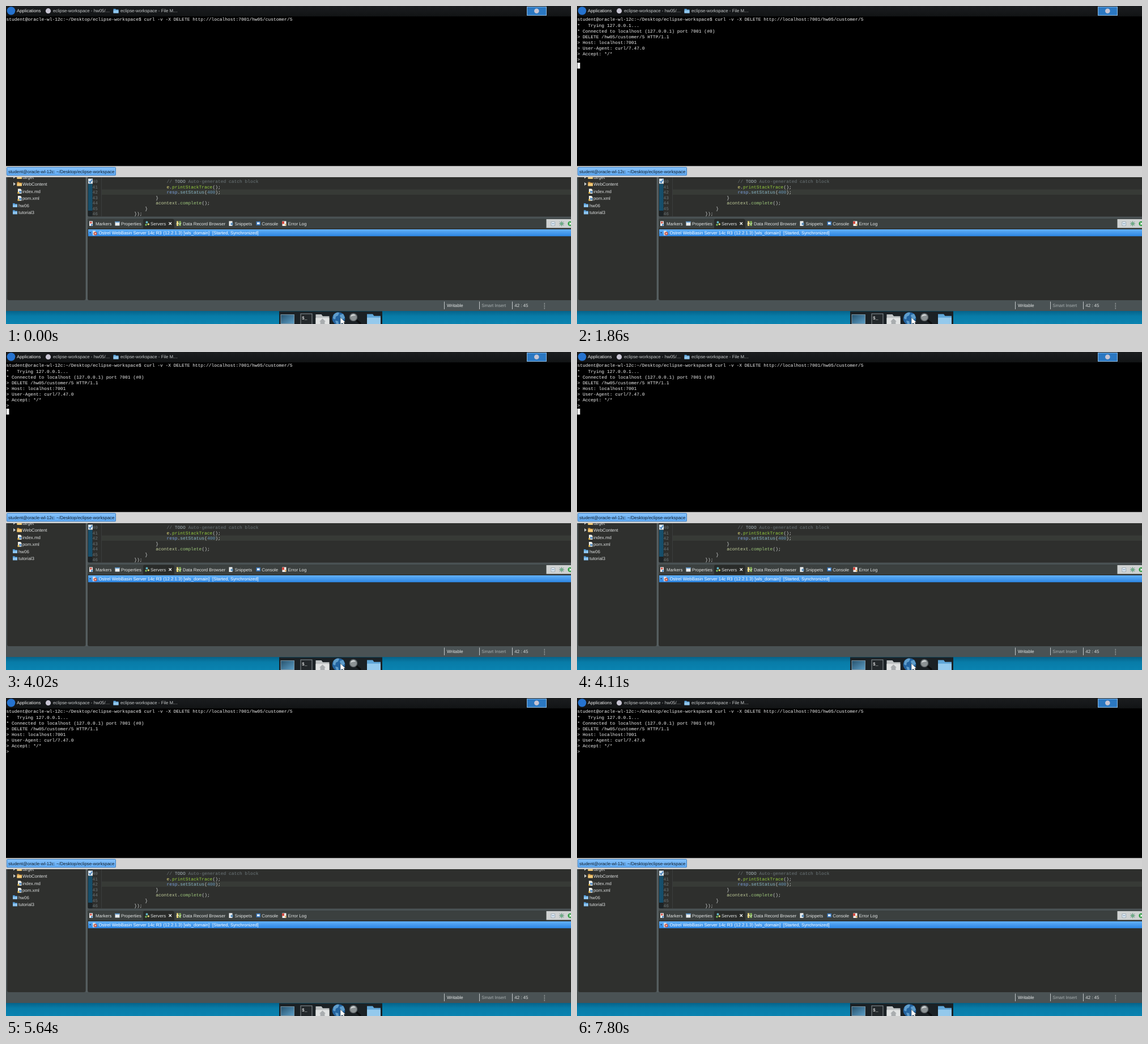
These frames come from a looping animation (997x561 px, 8000 ms). An HTML page:

```html
<!DOCTYPE html>
<html lang="en">
<head>
<meta charset="utf-8">
<title>Terminal session</title>
<style>
  html, body { margin: 0; width: 100%; height: 100%; overflow: hidden; background: #000; }
  svg { display: block; width: 997px; height: 561px; }
  text { white-space: pre; text-rendering: geometricPrecision; }
  .ui { font: 7.87px "Liberation Sans", Arial, sans-serif; }
  .mono { font: 7.95px "Liberation Mono", "Courier New", monospace; }
</style>
</head>
<body>
<svg id="stage" viewBox="0 0 997 561" xmlns="http://www.w3.org/2000/svg">
  <defs>
    <linearGradient id="bar" x2="0" y2="1"><stop stop-color="#1b1d1f"/><stop offset="1" stop-color="#121415"/></linearGradient>
    <linearGradient id="row" x2="0" y2="1"><stop stop-color="#62b0f8"/><stop offset="1" stop-color="#2c85e2"/></linearGradient>
    <linearGradient id="tab" x2="0" y2="1"><stop stop-color="#86c2fb"/><stop offset="1" stop-color="#5ea9f3"/></linearGradient>
    <linearGradient id="sky" x2="0" y2="1"><stop stop-color="#06638a"/><stop offset=".4" stop-color="#087ca8"/><stop offset="1" stop-color="#0a83b0"/></linearGradient>
    <linearGradient id="screen" x2="1" y2="1"><stop stop-color="#28546f"/><stop offset="1" stop-color="#5b9cc4"/></linearGradient>
  </defs>
</svg>
<script>
const NS = 'http://www.w3.org/2000/svg';
const LOOP = 8000;
const CH = 4.771;
const stage = document.getElementById('stage');
let layer = stage;

function add(tag, attrs, text) {
  const el = document.createElementNS(NS, tag);
  for (const k in attrs) el.setAttribute(k, attrs[k]);
  if (text) el.textContent = text;
  layer.appendChild(el);
  return el;
}
const rect = (x, y, w, h, fill, more) => add('rect', { x, y, width: w, height: h, fill, ...more });
const circle = (cx, cy, r, fill, more) => add('circle', { cx, cy, r, fill, ...more });
const path = (d, fill, more) => add('path', { d, fill, ...more });
const line = (d, stroke, w = 1) => path(d, 'none', { stroke, 'stroke-width': w });
const label = (x, y, s, fill = '#e4e6e6') => add('text', { x, y, fill, class: 'ui' }, s);
const mono = (x, y, s, fill = '#f2f2f2', more) => add('text', { x, y, fill, class: 'mono', ...more }, s);

// Colored pieces of one code line, laid out on the character grid
function code(x, y, ...parts) {
  for (const [s, fill, weight] of parts) {
    mono(x, y, s, fill, { 'font-weight': weight || 400 });
    x += s.length * CH;
  }
}
function folder(x, y, w, h, fill, front) {
  path(`M${x} ${y}h${w * .42}l${w * .1} ${h * .18}h${w * .48}v${h * .82}h${-w}z`, fill);
  rect(x, y + h * .35, w, h * .65, front);
}
function page(x, y) {
  path(`M${x} ${y}h4.5l2 2v6.5h-6.5z`, '#f1f1ea');
  rect(x + 2, y + 3.6, 4.2, 3.6, '#5a8fc6');
  rect(x - .6, y + 5.6, 3, 3, '#e2b64b');
}

function desktop() {
  rect(0, 538, 997, 23, 'url(#sky)');
  rect(482, 538.5, 182, 23, '#1b2125');
  rect(484.5, 544, 24.5, 18, '#7f98a6');
  rect(485.5, 545, 22.5, 15, 'url(#screen)');
  rect(519.5, 542.5, 21, 19, '#8d9497');
  rect(520.5, 543.5, 19, 18, '#23282b');
  mono(522, 552.5, '$_', '#ffffff', { 'font-weight': 700 });
  folder(546.5, 544, 24, 18, '#bfc3c4', '#e1e3e3');
  path('M553 556.5l5.5-5 5.5 5h-1.6v4.5h-7.8v-4.5z', '#a9adaf');
  circle(587, 551.5, 11.3, '#2464a0');
  path('M578 545q5-6 10-4l-2 5-4 2-1 5-4-2zM589 545l6-2 3 7-5 4-3-4zM581 555l5 1 1 5h-4z', '#5f9dcb');
  line('M617 553L626 560.5', '#0c0e0f', 3.4);
  circle(613, 549, 6.6, '#8d9395', { stroke: '#5c6265', 'stroke-width': 1.4 });
  path('M608 548a5 5 0 0 1 9-2q-4 0-9 2z', '#d0d4d5');
  folder(637, 543.5, 24, 18, '#5fa6d8', '#94c9ec');
  path('M590 549.5v11.5h1.5l1.6-2 1.5 2h3l-1.6-3h3z', '#ffffff', { stroke: '#20282c', 'stroke-width': .5 });
}

function tree() {
  rect(2, 296, 138.5, 223, '#2f302e', { rx: 3 });
  const rows = [[29, 304.6, 'target'], [29, 317, 'WebContent'], [29, 329.6, 'index.md'],
    [29, 342.1, 'pom.xml'], [22, 354.7, 'hw06'], [22, 367.2, 'tutorial3']];
  for (const [x, y, s] of rows) label(x, y, s, '#dddfdf');
  for (const y of [301.5, 314]) {
    path(`M13 ${y - 3}l4 3-4 3z`, '#c9cccc');
    folder(19.5, y - 3.5, 8.5, 7, '#d59a45', '#f0c877');
  }
  page(21, 322.5);
  page(21, 335);
  for (const y of [348, 360.3]) folder(12, y, 8, 7, '#4f98d4', '#8ec4ee');
}

function editor() {
  rect(144, 296, 860, 75.5, '#2e2f2d', { rx: 3 });
  rect(169, 323.6, 828, 9.4, '#373a36');
  rect(145, 302, 7.5, 69, '#1c2326');
  rect(145, 314, 7.5, 47, '#164e6a');
  line('M168.5 302V371', '#3a3d3c');
  for (let i = 0; i < 7; i++) mono(152.4, 312 + i * 9.5, String(40 + i), '#697377');
  rect(145, 304.5, 8, 9, '#dbe8f2');
  line('M146.5 309l2 2.5 3.5-5.5', '#2d71b5', 1.4);

  const gray = '#6d777a', plain = '#d0d3d3', lime = '#97cf3e';
  code(283.4, 312, ['// ', gray], ['TODO', '#a3b0b4', 700], [' Auto-generated catch block', gray]);
  code(283.4, 321.5, ['e', '#e3dc79'], ['.', plain], ['printStackTrace', lime], ['();', plain]);
  code(283.4, 331, ['resp', '#7a9fdc'], ['.', plain], ['setStatus', '#88b6c6'], ['(', plain], ['400', '#6897bb'], [');', plain]);
  code(264.3, 340.5, ['}', plain]);
  code(264.3, 350, ['acontext', '#c3cf9b'], ['.', plain], ['complete', '#9dc77a'], ['();', plain]);
  code(245.2, 359.5, ['}', plain]);
  code(226.2, 369, ['});', plain]);
}

function views() {
  rect(144, 375.5, 860, 143.5, '#2d2e2c', { rx: 3 });
  rect(144, 375.5, 853, 17, '#3b403f');
  path('M242 392.5v-14q0-3 3-3h48q3 0 4 3v14z', '#292b29');
  const tabs = [[158, 'Markers'], [203, 'Properties'], [255, 'Servers'], [312, 'Data Record Browser'],
    [403.5, 'Snippets'], [451.3, 'Console'], [497.6, 'Error Log']];
  for (const [x, s] of tabs) label(x, 386.8, s);
  line('M287.5 381.5l4.5 4.5M292 381.5l-4.5 4.5', '#f4f4f4', 1.2);

  rect(147, 379.5, 6, 8.5, '#eceeee');
  rect(148, 380.5, 3.5, 3, '#d45346');
  path('M150 384l4 2-4 2.5z', '#4f8cc8');
  rect(192.5, 380, 8, 7.5, '#e8ecee');
  rect(192.5, 380, 8, 2, '#5c97cc');
  circle(248.5, 381.5, 2, '#63b7c5');
  circle(247, 386, 1.7, '#74b95a');
  circle(251.3, 385, 1.8, '#d8cf72');
  rect(301, 379.5, 3.2, 8.5, '#e1cf72');
  rect(305.5, 379.5, 3.2, 8.5, '#86b65c');
  line('M300.5 384.5l3-2 3 3 3-2.5', '#f4f4e2', 1);
  rect(393.5, 379.5, 6, 8.5, '#edf0f1');
  rect(396.5, 382.5, 4, 4, '#5d8fbd');
  rect(441.5, 380, 7.5, 7, '#3975b8');
  rect(443, 381.7, 4.5, 3.4, '#eaf3fa');
  rect(487.5, 379.5, 7, 8.5, '#f0eeec');
  rect(487, 380, 4, 4.5, '#d54a40');
  path('M492 384l3 1-2 3.5z', '#e0a64b');

  rect(953.5, 376, 44, 15.5, '#cfd2d2');
  rect(962, 381, 6.5, 6.5, '#eef4f8', { stroke: '#7d93a6', 'stroke-width': .7 });
  line('M963.3 384.2h4', '#3f6f9b', 1);
  line('M977 380.5l7 7M984 380.5l-7 7M980.5 379.5v9M976 384h9', '#447a68', .8);
  circle(980.5, 384, 2.6, '#6dac86');
  circle(995.5, 384, 4.2, '#36a048');
  path('M994.5 381.5l4 2.5-4 2.5z', '#ffffff');

  rect(145, 394, 852, 12.2, 'url(#row)');
  path('M147 399l3.2 0-1.6 2.5z', '#1e4568');
  rect(153, 396.5, 5, 8, '#d9dfe4');
  circle(157.5, 401.5, 3, '#c9503f');
  path('M156.6 399.8l3 1.7-3 1.7z', '#f6ded4');
  label(163.5, 402.7, 'Ostrel WebBasin Server 14c R3', '#ffffff');
  label(277.4, 402.7, '(12.2.1.3) [wls_domain]', '#ffffff');
  label(364, 402.7, '[Started, Synchronized]', '#ffffff');
}

function statusBar() {
  for (const x of [773.5, 835.5, 893.5]) line(`M${x} 521.5V535`, '#c3c8c9');
  label(778, 531.2, 'Writable');
  label(839.3, 531.2, 'Smart Insert', '#a9b0b1');
  label(897.3, 531.2, '42 : 45', '#d9dcdc');
  for (let y = 524; y < 536; y += 3) rect(949.6, y, 1.3, 1.4, '#b8bebf');
}

function topBar() {
  rect(0, 0, 997, 18.3, 'url(#bar)');
  circle(9, 8.5, 7.3, '#2673cf');
  label(19, 11.3, 'Applications', '#f1f1f1');
  circle(74.5, 8.7, 4.6, '#c8c5d3');
  label(83, 11.3, 'eclipse-workspace - hw05/…', '#c6c9ca');
  folder(189.5, 5, 9, 7.5, '#579dd3', '#91c6ec');
  label(202, 11.3, 'eclipse-workspace - File M…', '#c6c9ca');
  rect(919.5, 1.5, 34, 15, '#2b78c2', { stroke: '#8dbbe3' });
  circle(936.3, 8.8, 4.3, '#c8c5d3');
}

function terminal() {
  rect(0, 18.3, 997, 264, '#000000');
  rect(0, 282.3, 997, 19.7, '#d3d3d3');
  rect(1.5, 284.5, 192, 14.3, 'url(#tab)', { stroke: '#3d7fc2', rx: 1 });
  label(4, 295, 'student@oracle-wl-12c: ~/Desktop/eclipse-workspace', '#101c28');
  mono(.5, 26.4, 'student@oracle-wl-12c:~/Desktop/eclipse-workspace$ curl -v -X DELETE http://localhost:7001/hw05/customer/5');

  layer = add('g', { opacity: 0 });
  const reply = layer;
  ['*   Trying 127.0.0.1...', '* Connected to localhost (127.0.0.1) port 7001 (#0)',
    '> DELETE /hw05/customer/5 HTTP/1.1', '> Host: localhost:7001', '> User-Agent: curl/7.47.0',
    '> Accept: */*', '>'].forEach((s, i) => mono(.5, 36.5 + i * 10.13, s));
  layer = stage;
  return {
    reply,
    typed: rect(506, 18.8, 5, 10.4, '#ffffff', { opacity: 0 }),
    waiting: rect(.6, 100, 4.8, 10.4, '#ffffff', { opacity: 0 })
  };
}

// Each step is [time, visible]; values hold until the next step
function play(el, steps) {
  const frames = [[0, 0], ...steps].map(([t, on]) => ({ offset: t / LOOP, opacity: on, easing: 'step-end' }));
  frames.push({ offset: 1, opacity: steps[steps.length - 1][1] });
  el.animate(frames, { duration: LOOP, iterations: Infinity }).startTime = 0;
}

rect(0, 300, 997, 238, '#4a5254');
rect(141, 302, 3, 217, '#565e60');
desktop();
tree();
editor();
views();
statusBar();
const shell = terminal();
topBar();

const blinks = Array.from({ length: 12 }, (_, i) => [1860 + i * 540, 1 - i % 2]);
play(shell.typed, [[540, 1], [1080, 0], [1620, 1], [1860, 0]]);
play(shell.reply, [[1860, 1]]);
play(shell.waiting, blinks);
</script>
</body>
</html>
```
